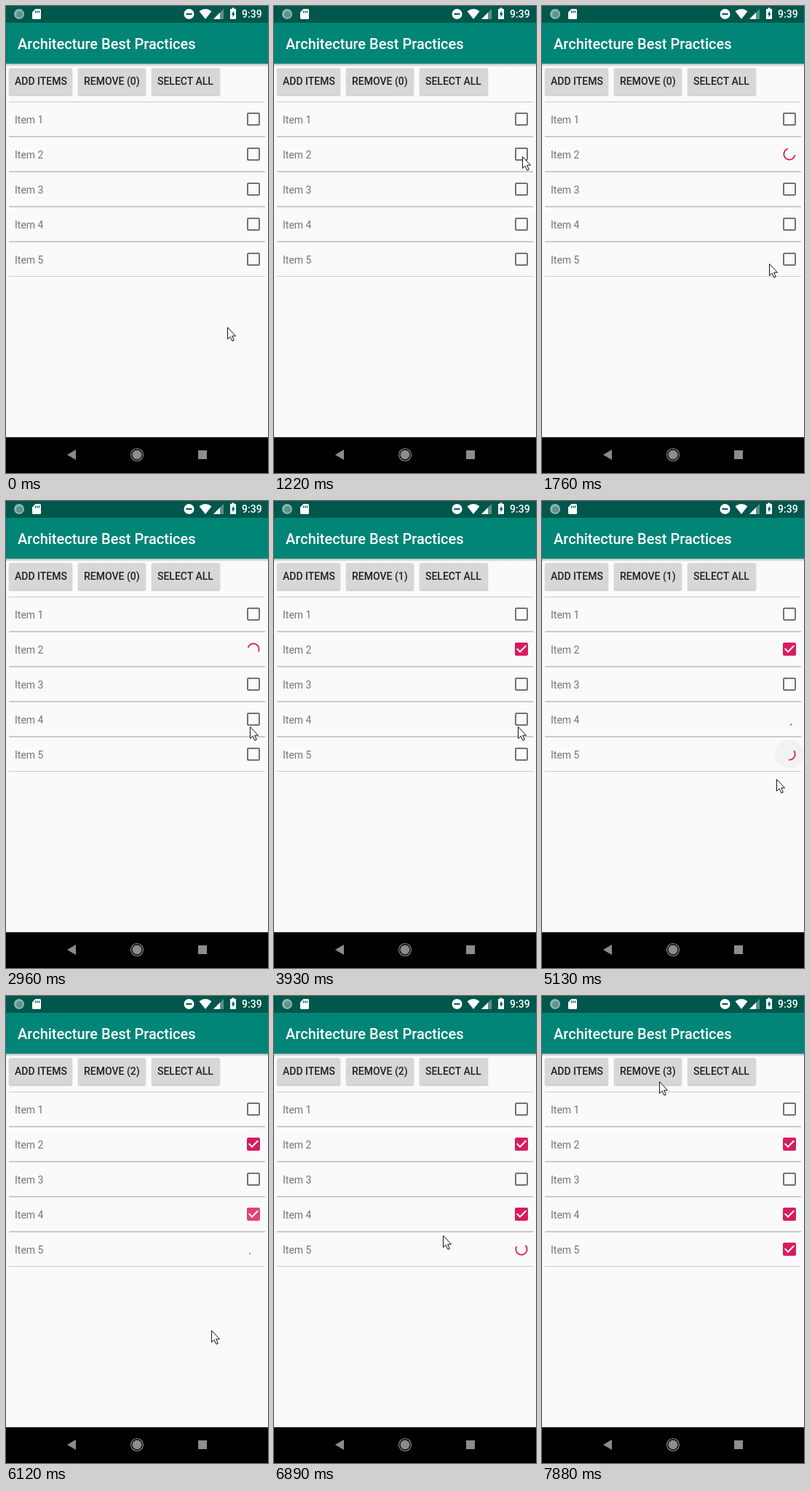
An HTML page for the animation above (7.99 s loop, 360 px wide and 640 px high).

```html
<!DOCTYPE html>
<html lang="en">
<head>
<meta charset="utf-8">
<title>Checklist</title>
<style>
  html, body { margin: 0; width: 100%; height: 100%; overflow: hidden; background: #fafafa; }
  svg { display: block; width: 100%; height: 100%; font-family: Roboto, sans-serif; }
  .title { font: 500 20px Roboto, sans-serif; fill: #fff; }
  .label { font: 500 14px Roboto, sans-serif; fill: #222; }
  .item { font: 400 14px Roboto, sans-serif; fill: #757575; }
  .clock { font: 500 14px Roboto, sans-serif; fill: #fff; }
</style>
</head>
<body>
<svg id="stage" viewBox="0 0 360 640">
  <defs>
    <linearGradient id="shade" x2="0" y2="1">
      <stop offset="0" stop-color="#000" stop-opacity=".28"/>
      <stop offset="1" stop-color="#000" stop-opacity="0"/>
    </linearGradient>
  </defs>
  <rect width="360" height="640" fill="#fafafa"/>
  <rect y="79" width="360" height="4" fill="url(#shade)"/>
  <rect width="360" height="79" fill="#008577"/>
  <rect width="360" height="23" fill="#00574b"/>
  <text class="title" x="16" y="59">Architecture Best Practices</text>

  <g id="status" fill="#fff">
    <circle cx="18" cy="11" r="7" fill="#8fb5af"/>
    <circle cx="18.5" cy="11.5" r="4.5" fill="#5f958c"/>
    <path d="M40.500 4H46.500a1.500 1.500 0 0 1 1.500 1.500V16.500a1.500 1.500 0 0 1-1.500 1.500H37.500a1.500 1.500 0 0 1-1.500-1.500V8.500z"/>
    <path d="M40.500 6.500v3M43 6.500v3M45.500 6.500v3" stroke="#00574b" stroke-width="1.300"/>
    <circle cx="251.500" cy="11" r="7"/>
    <rect x="247.500" y="10" width="8" height="2" fill="#00574b"/>
    <path d="M265.500 7.300Q274 .9 282.500 7.300L274 18z"/>
    <path d="M299 4V18H285z" opacity=".35"/>
    <path d="M294 9V18H285z"/>
    <path d="M310.500 2.500h3V4H316V18H308V4h2.500z"/>
    <path d="M312.800 6.500L309.800 11.800h1.800v3.700l3-5.300h-1.800z" fill="#00574b"/>
    <text class="clock" x="324" y="16">9:39</text>
  </g>

  <g id="buttons"></g>
  <g id="list"></g>

  <rect y="591" width="360" height="49" fill="#000"/>
  <g fill="#8c8c8c">
    <path d="M84 615L96 608V622z"/>
    <circle cx="180" cy="615" r="6.500"/>
    <circle cx="180" cy="615" r="8.500" fill="none" stroke="#8c8c8c" stroke-width="1.200"/>
    <rect x="264" y="609" width="12" height="12"/>
  </g>
  <path id="cursor" d="M0 0V16L3.600 12.700L6.400 18.700L8.800 17.600L6.100 11.700H11z"
        fill="#fff" stroke="#111" stroke-width="1"/>
</svg>
<script>
const LOOP = 7990, STEP = 109.15, LAST = 72, CX = 340;
const PINK = '#d81b60', PALE = '#e0437c';

// Row index -> step of the click and step of the finished check
const picks = { 1: { from: 12, start: 1320, done: 32 },
                3: { from: 36, start: 3890, done: 56 },
                4: { from: 44, start: 4800, done: 64 } };

// Pointer tip: step, x, y
const path = [
  [0, 304, 440], [6, 342, 210], [7, 342, 210], [8, 341, 206], [12, 341, 206],
  [16, 312, 353], [22, 312, 353], [26, 334, 313], [27, 335, 309], [36, 335, 309],
  [40, 336, 366], [41, 336, 354], [44, 336, 354], [50, 282, 458], [60, 282, 458],
  [67, 155, 127], [68, 156, 126], [71, 156, 126], [72, 161, 117]
];

const $ = id => document.getElementById(id);

function add(parent, tag, attrs, text) {
  const el = document.createElementNS('http://www.w3.org/2000/svg', tag);
  for (const k in attrs) el.setAttribute(k, attrs[k]);
  if (text) el.textContent = text;
  parent.append(el);
  return el;
}

function button(x, width, text) {
  const box = { x, y: 85, width, height: 37, rx: 2 };
  add($('buttons'), 'rect', { ...box, y: 86.5, fill: '#000', opacity: .12 });
  add($('buttons'), 'rect', { ...box, x: x - .5, width: width + 1, y: 85.7, fill: '#000', opacity: .1 });
  add($('buttons'), 'rect', { ...box, fill: '#d6d7d7' });
  return add($('buttons'), 'text', { class: 'label', x: x + 8, y: 108 }, text);
}

button(4, 87, 'ADD ITEMS');
const remove = button(99, 93, 'REMOVE (0)');
button(200, 94, 'SELECT ALL');

const list = $('list');
for (let i = 0; i < 6; i++) {
  const edge = i === 0 || i === 5;
  add(list, 'rect', { x: 4, y: (edge ? 131 : 130) + 48 * i - (i === 5 ? 1 : 0),
    width: 352, height: edge ? 1 : 2, fill: '#cbcbcb' });
}

const rows = [0, 1, 2, 3, 4].map(i => {
  const y = 155 + 48 * i;
  add(list, 'text', { class: 'item', x: 12, y: y + 6 }, 'Item ' + (i + 1));
  const ripple = add(list, 'circle', { cx: CX, cy: y, r: 20, fill: '#000', opacity: 0 });
  const empty = add(list, 'rect', { x: CX - 8, y: y - 8, width: 16, height: 16, rx: 1,
    fill: 'none', stroke: '#737373', 'stroke-width': 2 });
  const arc = add(list, 'path', { fill: 'none', stroke: PINK, 'stroke-width': 1.8 });
  const full = add(list, 'g', {});
  const box = add(full, 'rect', { x: CX - 9, y: y - 9, width: 18, height: 18, rx: 2 });
  add(full, 'path', { transform: `translate(${CX - 12} ${y - 12})`, fill: '#fff',
    d: 'M10 17l-5-5 1.410-1.410L10 14.170l7.590-7.590L19 8z' });
  return { y, ripple, empty, arc, full, box };
});

const show = (el, on) => el.setAttribute('visibility', on ? 'visible' : 'hidden');
const clamp = v => Math.min(1, Math.max(0, v));

// cubic-bezier(.4, 0, .2, 1)
function ease(x) {
  let lo = 0, hi = 1;
  for (let i = 0; i < 16; i++) {
    const u = (lo + hi) / 2, v = 1 - u;
    if (1.2 * v * v * u + .6 * v * u * u + u * u * u < x) lo = u; else hi = u;
  }
  return lo * lo * (3 - 2 * lo);
}

// Indeterminate ring: the head runs ahead, then the tail catches up
function ring(y, ms) {
  const p = ms / 1333 % 1;
  const turn = p / 4 + ms / 2222;
  const tail = .75 * ease(clamp(2 * p - 1)) + turn;
  const head = Math.max(.75 * ease(clamp(2 * p)) + turn, tail + .03);
  const at = a => {
    const r = 2 * Math.PI * a;
    return `${(CX + 7.7 * Math.sin(r)).toFixed(2)} ${(y - 7.7 * Math.cos(r)).toFixed(2)}`;
  };
  return `M${at(tail)}A7.7 7.7 0 ${head - tail > .5 ? 1 : 0} 1 ${at(head)}`;
}

function pointer(k) {
  let i = 1;
  while (i < path.length - 1 && path[i][0] < k) i++;
  const [a, x0, y0] = path[i - 1], [b, x1, y1] = path[i];
  const u = clamp((k - a) / (b - a)), e = u * u * (3 - 2 * u);
  return `translate(${Math.round(x0 + (x1 - x0) * e) + .5} ${Math.round(y0 + (y1 - y0) * e) + .5})`;
}

function draw(t) {
  const k = Math.min(LAST, Math.max(0, Math.floor((t - 2) / STEP)));
  let count = 0;
  rows.forEach((row, i) => {
    const pick = picks[i];
    const busy = !!pick && k >= pick.from && k < pick.done;
    const done = !!pick && k >= pick.done;
    const age = pick ? k - pick.from : -1;
    show(row.empty, !busy && !done);
    show(row.arc, busy);
    show(row.full, done);
    row.ripple.setAttribute('opacity', age >= 0 && age < 3 ? .1 - .035 * age : 0);
    if (busy) row.arc.setAttribute('d', ring(row.y, k * 109.4 - pick.start));
    if (done) {
      count++;
      row.box.setAttribute('fill', k === pick.done ? PALE : PINK);
    }
  });
  remove.textContent = `REMOVE (${count})`;
  $('cursor').setAttribute('transform', pointer(k));
}

const begin = performance.now();
function tick() {
  draw((performance.now() - begin) % LOOP);
  requestAnimationFrame(tick);
}
tick();
</script>
</body>
</html>
```
